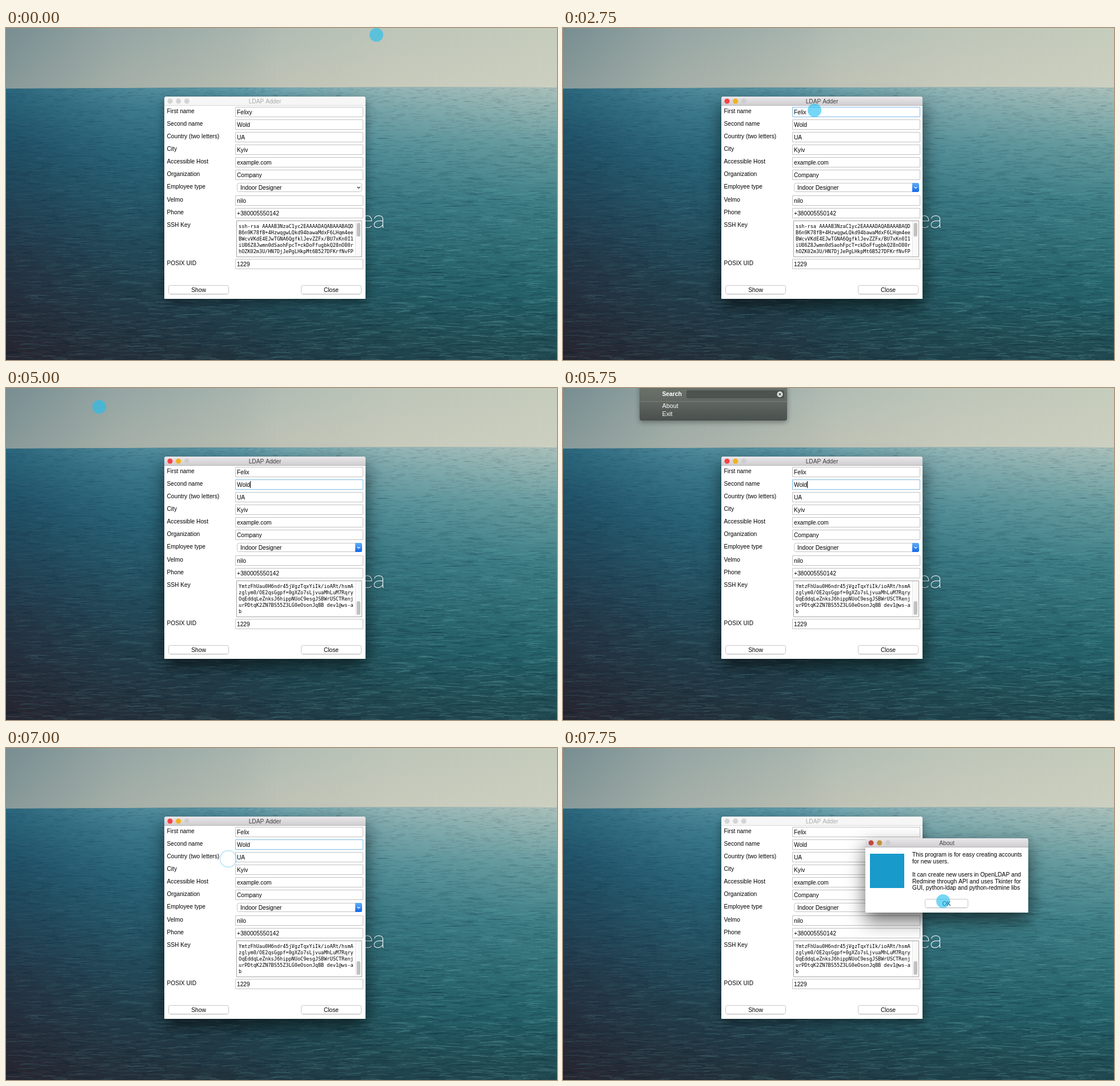
These frames come from a looping animation (964x581 px, 8000 ms). An HTML page with a canvas:

```html
<!DOCTYPE html>
<html lang="en">
<head>
<meta charset="utf-8">
<title>LDAP Adder</title>
<style>
html, body { margin: 0; width: 100%; height: 100%; overflow: hidden; background: #2a5a6a; }
canvas { display: block; }
</style>
</head>
<body>
<canvas id="stage" width="964" height="581"></canvas>
<script>
const W = 964, H = 581, LOOP = 8000, STEP = 250;
const ctx = document.getElementById('stage').getContext('2d');
const SANS = '"Liberation Sans", Arial, sans-serif';
const UI = '10.2px ' + SANS;
const MONO = '8.56px "DejaVu Sans Mono", monospace';

const KEY = [
  'ssh-rsa AAAAB3NzaC1yc2EAAAADAQABAAABAQD',
  'B6n9K78fB+4HzwqgwLQkd94bawaMdxF6LHqm4ee',
  'BWcvVKdE4EJwTGNA6QgfklJevZZFx/BU7xKn0I1',
  'iU86Z8Jwmn0dSaohFpcT+ckDoFfugbkQ28nO80r',
  'hOZK02m3U/HN7DjJePgLHkpMt6B527DFKrfNvFP',
  'q7RtLx0Vd5WcEo2uHs9KyGa4Pz/mB8nJi3TfQeX',
  'YmtzFhUau0H6ndr45jVgzTqxYiIk/ioARt/hsmA',
  'zglym0/OE2qsGgpf+0gXZo7sLjvuaMhLuM7Rqry',
  'OqEddqLeZnksJ6hippNUoC9esgJSBWrUSCTRenj',
  'urPDtqK2ZN7BS55Z3LG0eOsonJqBB dev1@ws-a',
  'b'
];

// label, label centre, field top, value
const ROWS = [
  ['First name', 145, 138], ['Second name', 167, 160, 'Wold'],
  ['Country (two letters)', 189, 182, 'UA'], ['City', 211, 204, 'Kyiv'],
  ['Accessible Host', 233, 226, 'example.com'], ['Organization', 255, 248, 'Company'],
  ['Employee type', 277], ['Velmo', 300.5, 293, 'nilo'],
  ['Phone', 322.5, 315, '+380005550142'], ['SSH Key', 344.5], ['POSIX UID', 411, 404, '1229']
];

// start time, x, y, kind; each entry holds until the next
const POINTER = [
  [0, 648, 12, 'dot'], [250, 575, 105, 'dot'], [500, 470, 184, 'dot'], [750, 440, 155, 'dot'],
  [1250, 440, 155, 'ring'], [1500],
  [2750, 440, 144, 'dot'], [3000, 448, 170, 'ring'], [3250, 478, 262, 'dot'],
  [3500, 510, 353, 'dot'], [3750],
  [4750, 310, 150, 'dot'], [5000, 163, 33, 'dot'], [5250, 150, 8, 'dot'], [5500],
  [6500, 192, 32, 'dot'], [6750, 265, 95, 'dot'], [7000, 389, 194, 'ring'],
  [7250, 560, 235, 'dot'], [7500, 670, 259, 'dot'], [7750, 665, 268, 'dot']
];

const latest = (list, t) => list.filter(k => k[0] <= t).pop();
const within = (t, a, b) => t >= a && t < b;

function text(s, x, cy, { font = UI, fill = '#000', align = 'left', c = ctx } = {}) {
  c.font = font;
  c.fillStyle = fill;
  c.textAlign = align;
  c.fillText(s, x, cy + 3.6);
}

function box(x, y, w, h, r, fill, stroke) {
  ctx.beginPath();
  ctx.roundRect(x, y, w, h, r);
  if (fill) { ctx.fillStyle = fill; ctx.fill(); }
  if (stroke) { ctx.strokeStyle = stroke; ctx.lineWidth = 1; ctx.stroke(); }
}

function disc(x, y, r, fill) {
  ctx.beginPath();
  ctx.arc(x, y, r, 0, Math.PI * 2);
  ctx.fillStyle = fill;
  ctx.fill();
}

function line(points, color, width = 1) {
  ctx.beginPath();
  points.forEach(([x, y]) => ctx.lineTo(x, y));
  ctx.strokeStyle = color;
  ctx.lineWidth = width;
  ctx.stroke();
}

function ramp(c, x0, y0, x1, y1, stops) {
  const g = c.createLinearGradient(x0, y0, x1, y1);
  stops.forEach(([p, color]) => g.addColorStop(p, color));
  return g;
}

function layer() {
  const el = document.createElement('canvas');
  el.width = W;
  el.height = H;
  return el.getContext('2d');
}

function random(seed) {
  return () => (seed = (seed * 16807) % 2147483647) / 2147483647;
}

// Three vertical ramps blended from left to right
function blend(c, y0, y1, columns) {
  const masks = [
    null,
    [[0, '#0000'], [0.2, '#0008'], [0.5, '#000'], [1, '#000']],
    [[0, '#0000'], [0.42, '#0000'], [0.7, '#000a'], [1, '#000']]
  ];
  columns.forEach((stops, i) => {
    const l = layer();
    l.fillStyle = ramp(l, 0, y0, 0, y1, stops);
    l.fillRect(0, 0, W, H);
    if (masks[i]) {
      l.globalCompositeOperation = 'destination-in';
      l.fillStyle = ramp(l, 0, 0, W, 0, masks[i]);
      l.fillRect(0, 0, W, H);
    }
    c.drawImage(l.canvas, 0, 0);
  });
}

function makeSea() {
  const c = layer();
  blend(c, 0, 106, [
    [[0, '#788e92'], [1, '#889a99']],
    [[0, '#adb9b2'], [1, '#bec1b4']],
    [[0, '#c5ccbc'], [1, '#cccfc0']]
  ]);
  c.save();
  c.beginPath();
  c.moveTo(0, 106);
  c.quadraticCurveTo(W / 2, 103, W, 104);
  c.lineTo(W, H);
  c.lineTo(0, H);
  c.clip();
  blend(c, 104, H, [
    [[0, '#2a667d'], [0.2, '#205066'], [0.42, '#214255'], [0.65, '#243343'], [1, '#28252f']],
    [[0, '#69a2ae'], [0.08, '#4a8c9c'], [0.25, '#2f7387'], [0.6, '#225563'], [1, '#213640']],
    [[0, '#abc0ba'], [0.08, '#93b4b1'], [0.2, '#6c9fa1'], [0.42, '#3f8087'], [0.75, '#25636a'], [1, '#20484f']]
  ]);
  // Ripples grow longer and thicker towards the viewer
  const rnd = random(4127);
  for (let i = 0; i < 12000; i++) {
    const u = rnd() ** 1.35, x = rnd() * W, y = 105 + u * 478;
    const len = 5 + (8 + 26 * rnd()) * Math.sqrt(u), tilt = (rnd() - 0.45) * 3 * u;
    const dark = rnd() < 0.5;
    c.beginPath();
    c.moveTo(x - len / 2, y + tilt);
    c.quadraticCurveTo(x, y - 1.5 * u, x + len / 2, y - tilt);
    c.lineWidth = 0.5 + u * 0.9;
    c.strokeStyle = dark ? `rgba(10,30,50,${0.1 + 0.13 * rnd()})`
      : `rgba(110,175,178,${0.04 + 0.2 * rnd() * (0.4 + x / W)})`;
    c.stroke();
  }
  c.restore();
  text('sea', 663.5, 346.4, { font: '100 41px Roboto, Lato, sans-serif', fill: '#fff', align: 'right', c });
  return c.canvas;
}

function frame(x, y, w, h, title, active, lights) {
  ctx.save();
  ctx.shadowColor = active ? 'rgba(0,0,0,.6)' : 'rgba(0,0,0,.42)';
  ctx.shadowBlur = active ? 32 : 17;
  ctx.shadowOffsetY = active ? 14 : 6;
  box(x, y, w, h, [4, 4, 0, 0], '#fff');
  ctx.restore();
  const bar = active ? ramp(ctx, 0, y, 0, y + 15, [[0, '#eae7ea'], [1, '#d1ced1']]) : '#f6f6f6';
  box(x, y, w, 15, [4, 4, 0, 0], bar);
  ctx.fillStyle = active ? '#b5b3b5' : '#d8d8d8';
  ctx.fillRect(x, y + 15, w, 1);
  lights.forEach((color, i) => disc(x + 10 + i * 14.7, y + 8, 4.5, color));
  text(title, x + w / 2, y + 8, { fill: active ? '#444' : '#aaa', align: 'center' });
}

function button(label, x, y, w) {
  box(x + 0.5, y + 0.5, w, 15, 3, '#fff', '#c6c6c6');
  line([[x + 3, y + 16], [x + w - 2, y + 16]], '#b2b2b2', 0.6);
  text(label, x + w / 2 + 0.5, y + 8, { align: 'center' });
}

function field(y, value, focused, caret) {
  box(401.5, y + 0.5, 223, 17, 0, '#fff', focused ? '#7ebbe8' : '#c2c2c2');
  text(value, 404, y + 9);
  if (caret) {
    const x = Math.round(404 + ctx.measureText(value).width) + 0.5;
    line([[x, y + 3], [x, y + 15]], '#000');
  }
}

function select(active) {
  box(404.5, 271.5, 218, 15, 3, '#fff', '#c4c4c4');
  text('Indoor Designer', 410, 279);
  if (active) {
    box(611, 271, 12, 16, [0, 3, 3, 0], ramp(ctx, 0, 271, 0, 287, [[0, '#64aef8'], [1, '#0e67ed']]));
  }
  line([[614.5, 278], [617, 280.5], [619.5, 278]], active ? '#fff' : '#333', 1.2);
}

function keyBox(scroll) {
  box(403.5, 337.5, 219, 63, 0, '#fff', '#a2a2a2');
  ctx.save();
  ctx.beginPath();
  ctx.rect(405, 341, 206, 56);
  ctx.clip();
  KEY.forEach((s, i) => text(s, 407, 347 + i * 11 - 66 * scroll - 0.4, { font: MONO }));
  ctx.restore();
  ctx.fillStyle = '#fafafa';
  ctx.fillRect(611, 338, 11, 62);
  line([[611.5, 338], [611.5, 400]], '#e6e6e6');
  box(613.5, 341 + 32 * scroll, 6.5, 24, 3.2, '#c1c1c1');
}

function form(t) {
  const active = within(t, 1250, 7250);
  const focus = !active ? -1 : t < 3000 ? 0 : 1;
  const caret = !(within(t, 2750, 3000) || within(t, 3500, 4500) || within(t, 5250, 5500) || within(t, 6750, 7250));
  const scroll = latest([[0, 0], [4000, 0.2], [4250, 0.65], [4500, 1]], t)[1];
  frame(277, 120, 352, 354, 'LDAP Adder', active,
    active ? ['#f7404a', '#f1b31c', '#cfcdcf'] : ['#d4d4d4', '#d4d4d4', '#d4d4d4']);
  ROWS.forEach(([label, cy, top, value], i) => {
    text(label, 281.5, cy);
    if (top) field(top, value || (t < 2000 ? 'Felixy' : 'Felix'), i === focus, i === focus && caret);
  });
  select(active);
  keyBox(scroll);
  button('Show', 284, 450, 105);
  button('Close', 516, 450, 105);
}

function menu(t) {
  const white = { fill: '#fff', font: '10.8px ' + SANS };
  ctx.save();
  ctx.shadowColor = 'rgba(0,0,0,.35)';
  ctx.shadowBlur = 10;
  ctx.shadowOffsetY = 3;
  box(134, -10, 258, 67, 4, ramp(ctx, 0, 0, 0, 57, [[0, '#6a706a'], [0.4, '#616761'], [1, '#494f4d']]));
  ctx.restore();
  text('Search', 173.5, 10.5, { fill: '#fff', font: 'bold 10.3px ' + SANS });
  box(216, 4, 171, 14, 3, '#4d534f');
  disc(379.5, 11, 5, '#e4e6e4');
  line([[377.5, 9], [381.5, 13]], '#4d534f', 1.2);
  line([[381.5, 9], [377.5, 13]], '#4d534f', 1.2);
  line([[134, 23.5], [392, 23.5]], '#7b817b');
  if (t >= 6000) {
    ctx.fillStyle = ramp(ctx, 0, 25, 0, 40, [[0, '#1a63ee'], [1, '#0c56ea']]);
    ctx.fillRect(134, 25, 258, 15);
  }
  text('About', 173.5, 31.5, white);
  text('Exit', 173.5, 45.5, white);
}

function about() {
  frame(529, 158, 285, 130, 'About', true, ['#bd4a40', '#c4943a', '#cfcdcf']);
  ctx.fillStyle = '#189acb';
  ctx.fillRect(537, 185, 60, 60);
  [
    ['This program is for easy creating accounts', 186], ['for new users.', 198],
    ['It can create new users in OpenLDAP and', 221.5],
    ['Redmine through API and uses Tkinter for', 233],
    ['GUI, python-ldap and python-redmine libs', 244.5]
  ].forEach(([s, y]) => text(s, 611, y));
  button('OK', 633, 264, 75);
}

function pointer(t) {
  const [, x, y, kind] = latest(POINTER, t);
  if (kind === 'dot') disc(x, y, 12, 'rgba(30,190,240,.62)');
  if (kind === 'ring') {
    ctx.beginPath();
    ctx.arc(x, y, 14.5, 0, Math.PI * 2);
    ctx.strokeStyle = t < 5000 ? 'rgba(60,180,225,.4)' : 'rgba(60,180,225,.3)';
    ctx.lineWidth = 2;
    ctx.stroke();
  }
}

const sea = makeSea();

function draw() {
  const t = Math.floor((performance.now() % LOOP) / STEP) * STEP;
  ctx.drawImage(sea, 0, 0);
  form(t);
  if (within(t, 5500, 6750)) menu(t);
  if (t >= 7250) about();
  pointer(t);
  requestAnimationFrame(draw);
}
draw();
</script>
</body>
</html>
```
